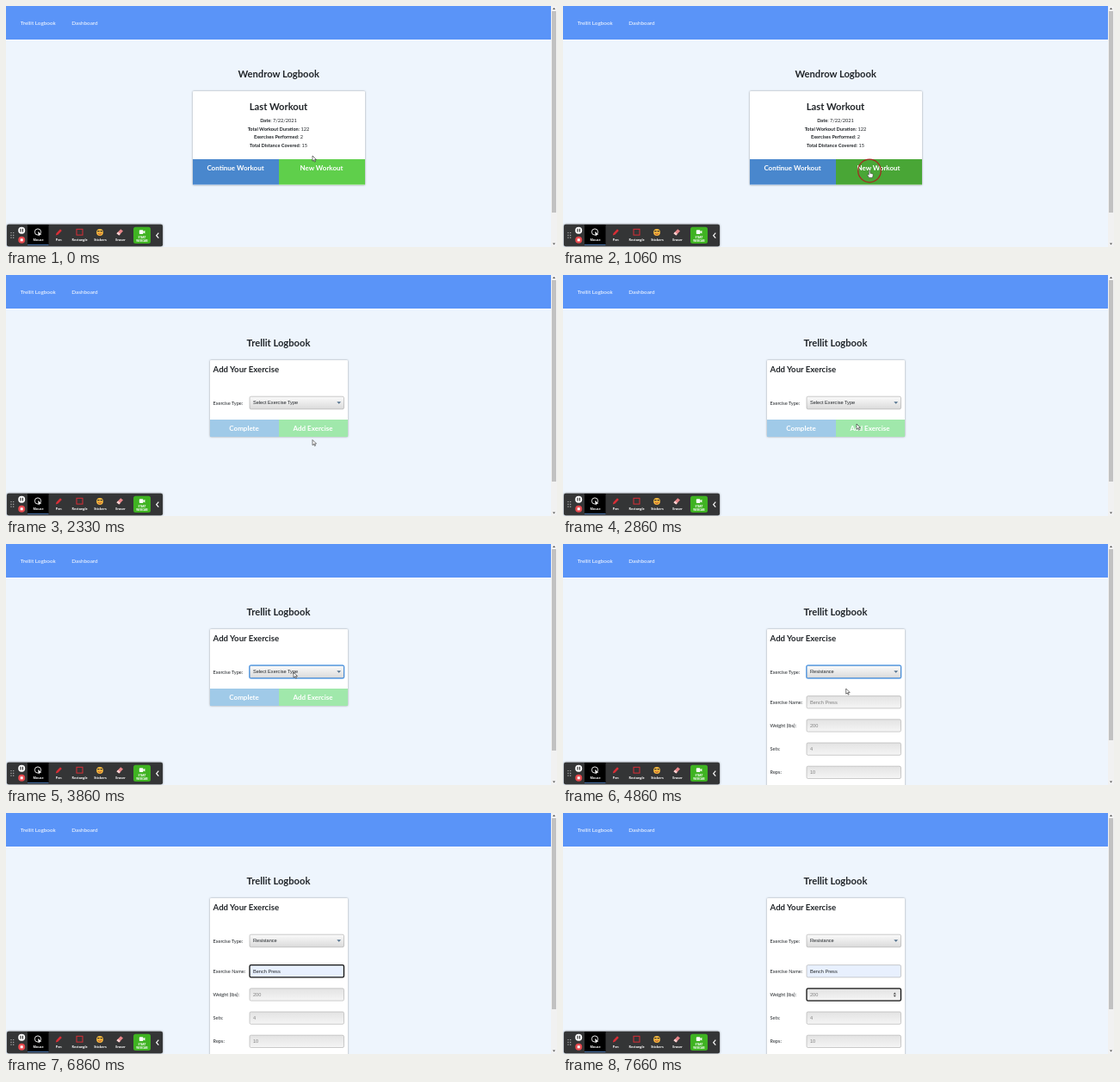
An HTML page for the animation above (8 s loop, 640 by 280 pixels).

```html
<!DOCTYPE html>
<html lang="en">
<head>
<meta charset="utf-8">
<title>Workout log</title>
<style>
html, body { margin: 0; width: 100%; height: 100%; overflow: hidden; background: #eef5fd; }
svg { display: block; width: 640px; height: 280px; }
text { font-family: Lato, sans-serif; fill: #212529; white-space: pre; }
.b { font-weight: 700; }
.mid { text-anchor: middle; }
.h1 { font-size: 11.2px; }
.h2 { font-size: 9.6px; }
.nav { font-size: 6.4px; fill: #fff; }
.row { font-size: 5.6px; }
.btn { font-size: 8px; fill: #fff; }
.val { font: 5.6px "Liberation Sans", Arial, sans-serif; }
.ph { fill: #808080; }
.tool { font: 700 3.7px "Open Sans", sans-serif; fill: #fff; text-anchor: middle; }
.card { fill: #fff; filter: drop-shadow(0 .5px 1.2px rgba(0,0,0,.38)); }
</style>
</head>
<body>
<svg viewBox="0 0 640 280">
  <defs>
    <linearGradient id="sel" x2="0" y2="1">
      <stop stop-color="#fbfbfb"/><stop offset="1" stop-color="#dadada"/>
    </linearGradient>
    <linearGradient id="inp" x2="0" y2="1">
      <stop stop-color="#e3e3e3"/><stop offset="1" stop-color="#f5f5f5"/>
    </linearGradient>
  </defs>
  <rect width="640" height="280" fill="#eef5fd"/>
  <rect width="633" height="39" fill="#5a94f8"/>
  <rect y="39" width="633" height="1" fill="#fbfdff"/>
  <text class="nav" x="16.7" y="22.3">Trellit Logbook</text>
  <text class="nav" x="76.2" y="22.3">Dashboard</text>

  <g id="home">
    <text class="h1 b mid" x="316.7" y="82.6">Wendrow Logbook</text>
    <rect class="card" x="217" y="99" width="200" height="109" rx="1"/>
    <text class="h1 b mid" x="316.5" y="120.6">Last Workout</text>
    <g id="stats"></g>
    <rect x="217" y="178" width="100" height="29.6" fill="#4987cd"/>
    <rect id="newBtn" x="317" y="178" width="100" height="29.6"/>
    <text class="btn b mid" x="266.5" y="191">Continue Workout</text>
    <text class="btn b mid" x="366.5" y="191">New Workout</text>
  </g>

  <g id="page">
    <text class="h1 b mid" x="316.5" y="82.6">Trellit Logbook</text>
    <rect id="card" class="card" x="237" y="99" width="160" height="89" rx="1"/>
    <text class="h2 b" x="240.6" y="112.6">Add Your Exercise</text>
    <text class="row" x="240.6" y="150.9">Exercise Type:</text>
    <rect id="glow" x="282" y="140.2" width="111.4" height="16.6" rx="2.5" fill="#7fb9f5"/>
    <rect id="select" x="283" y="141.2" width="109.5" height="14.6" rx="1.6" fill="url(#sel)"/>
    <text id="choice" class="val" x="287" y="150.4"></text>
    <path id="drop" d="M384.3 147.2h4.8l-2.4 2.6z"/>
    <g id="buttons">
      <rect x="237" y="168" width="80" height="20" fill="#a0cae8"/>
      <rect x="317" y="168" width="80" height="20" fill="#a0e8ab"/>
      <text class="btn b mid" x="276.6" y="181.4">Complete</text>
      <text class="btn b mid" x="356.5" y="181.4">Add Exercise</text>
    </g>
    <g id="fields"></g>
    <path id="caret" d="M288 180.7v6.3" stroke="#111" stroke-width=".6"/>
    <path id="spin" d="M383.7 210.4l1.6-2 1.6 2zM383.7 211.7l1.6 2 1.6-2z" fill="#444"/>
  </g>

  <rect x="633" width="7" height="280" fill="#f1f1f1"/>
  <rect id="thumb" x="634" y="6" width="5" fill="#c1c1c1"/>
  <path d="M635 4h3l-1.500-2zM635 275.500h3l-1.500 2z" fill="#505050"/>

  <g id="bar">
    <rect x="1" y="253.700" width="181" height="25.600" rx="2" fill="#343536"
      style="filter:drop-shadow(0 0 1.200px rgba(0,0,0,.5))"/>
    <rect x="25" y="254" width="24.500" height="24" fill="#000"/>
    <path d="M25 277.500h24.500" stroke="#5d92d8" stroke-width=".8"/>
    <path d="M6 263v7M8.700 263v7" stroke="#bbb" stroke-width="1.100" stroke-dasharray="1.100 1.700"/>
    <circle cx="18.200" cy="260.700" r="4" fill="#fff"/>
    <path d="M17 258.800v3.800M19.400 258.800v3.800" stroke="#222" stroke-width="1.100"/>
    <circle cx="18.200" cy="271.800" r="4" fill="#e5484d"/>
    <rect x="16.700" y="270.300" width="3" height="3" fill="#fff"/>
    <circle cx="37" cy="262.500" r="3.600" fill="none" stroke="#fff" stroke-width=".9"/>
    <path d="M37 262l4.300 3.500-2.200.3-1 2z" fill="#fff"/>
    <path d="M57.800 266.500l.7-2.500 4.500-4.800 1.900 1.800-4.600 4.800z" fill="#d92e36"/>
    <rect x="82" y="259.300" width="7" height="6.800" fill="none" stroke="#d92e36"/>
    <circle cx="109" cy="263" r="3.900" fill="#f5b83d"/>
    <path d="M106.300 261.700h2.200M109.600 261.700h2.200" stroke="#333" stroke-width="1.200"/>
    <path d="M107 264.400q2 2 4 0" fill="none" stroke="#a33" stroke-width=".8"/>
    <path d="M128.500 264.300l4.700-5 2.800 2.300-4.700 5z" fill="#e9868a"/>
    <path d="M128.500 264.300l1.600-1.700 2.800 2.300-1.600 1.700z" fill="#f6d5d5"/>
    <rect x="148" y="256.800" width="20" height="19.300" rx="2.500" fill="#3fb322"/>
    <rect x="154.800" y="260.300" width="4.600" height="4.800" rx=".8" fill="#fff"/>
    <path d="M159.200 262.200l2.200-1.500v3.800l-2.200-1.500z" fill="#fff"/>
    <path d="M177.300 263.700l-2.600 3 2.600 3" fill="none" stroke="#fff" stroke-width="1.200"/>
  </g>

  <circle id="ring" fill="none" stroke="#a52a22" stroke-width="1.300"/>
  <g id="cursor">
    <path id="arrow" d="M0 0v6.200l1.500-1.300 1 2.200 1-.4-1-2.200h2z" fill="#fff" stroke="#222" stroke-width=".6"/>
    <path id="hand" d="M-.7 0q.8-.8 1.500 0v2.800l2.700.7q.8.300.7 1.200l-.7 3.300h-4l-2-3.300q.4-1 1.800 0z"
      fill="#fff" stroke="#222" stroke-width=".5"/>
    <path id="beam" d="M-1-3h2M0-3v6M-1 3h2" fill="none" stroke="#333" stroke-width=".6"/>
  </g>
</svg>
<script>
const LOOP = 8000;
const $ = id => document.getElementById(id);
const set = (el, attrs) => { for (const k in attrs) el.setAttribute(k, attrs[k]); return el; };
const show = (id, on) => { $(id).style.display = on ? '' : 'none'; };
const add = (parent, tag, attrs, text = '') => {
  const el = set(document.createElementNS('http://www.w3.org/2000/svg', tag), attrs);
  el.textContent = text;
  return parent.appendChild(el);
};

[['Date', '7/22/2021'], ['Total Workout Duration', '122'],
 ['Exercises Performed', '2'], ['Total Distance Covered', '15']].forEach(([name, value], i) => {
  const line = add($('stats'), 'text', { class: 'row mid', x: 316.5, y: 135.1 + i * 9.65 });
  add(line, 'tspan', { class: 'b' }, name);
  add(line, 'tspan', {}, ': ' + value);
});

const fields = [['Exercise Name:', 'Bench Press'], ['Weight (lbs):', '200'],
  ['Sets:', '4'], ['Reps:', '10']].map(([label, hint], i) => {
  const y = 176.6 + i * 27.2, g = $('fields');
  add(g, 'text', { class: 'row', x: 240.6, y: y + 9.1 }, label);
  return {
    box: add(g, 'rect', { x: 283, y, width: 109.5, height: 14.3, rx: 1.6 }),
    text: add(g, 'text', { x: 287, y: y + 9.1 }, hint)
  };
});

[['Mouse', 37.500], ['Pen', 61.300], ['Rectangle', 85.700], ['Stickers', 109.500], ['Eraser', 133]]
  .forEach(([name, x]) => add($('bar'), 'text', { class: 'tool', x, y: 272.7 }, name));
['START', 'WEBCAM'].forEach((word, i) =>
  add($('bar'), 'text', { class: 'tool', x: 158, y: 270.3 + i * 3.2, style: 'font-size:3px' }, word));

// time, x, y
const path = [[0, 356, 174], [560, 356, 191.5], [2330, 356, 191.5], [2860, 341, 173],
  [3260, 334, 149], [4859, 334, 149], [4860, 328.7, 168], [5260, 318, 184]];
// start, end, x, y
const clicks = [[960, 1360, 356, 191.5], [3400, 3700, 334, 149], [5600, 5900, 318, 184]];

function pointAt(t) {
  const i = path.findIndex(p => p[0] > t);
  if (i < 0) return path[path.length - 1].slice(1);
  const [a, b] = [path[i - 1], path[i]];
  const u = (t - a[0]) / (b[0] - a[0]), e = u * u * (3 - 2 * u);
  return [a[1] + (b[1] - a[1]) * e, a[2] + (b[2] - a[2]) * e];
}

function styleField({ box, text }, focused, filled) {
  set(box, {
    fill: filled ? '#e8f0fe' : 'url(#inp)',
    stroke: focused ? '#101010' : '#a9a9a9',
    'stroke-width': focused ? 1.3 : .6
  });
  set(text, { class: filled ? 'val' : 'val ph' });
}

function draw(t) {
  const step = Math.max(0, Math.floor((t - 60) / 100) * 100 + 60);
  const home = t < 2330, form = t >= 4860;
  const picked = t >= 3400 && t < 5600;

  show('home', home);
  show('page', !home);
  set($('newBtn'), { fill: t < 360 ? '#5fcf4b' : t >= 960 && t < 1360 ? '#49a636' : '#53b536' });

  set($('card'), { height: form ? 190 : 89 });
  show('buttons', !form);
  show('fields', form);
  show('glow', picked);
  set($('select'), { stroke: picked ? '#3b82cf' : '#a5a5a5', 'stroke-width': picked ? .9 : .6 });
  $('choice').textContent = form ? 'Resistance' : 'Select Exercise Type';
  set($('drop'), { fill: '#50708c' });
  fields.forEach((f, i) => styleField(f,
    i === 0 && t >= 5600 && t < 7130 || i === 1 && t >= 7130,
    i === 0 && t >= 5800));
  show('caret', t >= 5600 && t < 6400);
  show('spin', t >= 7130);
  set($('thumb'), { height: form ? 222 : 234 });

  const hit = clicks.find(c => step >= c[0] && step < c[1]);
  show('ring', hit);
  if (hit) set($('ring'), { cx: hit[2], cy: hit[3], r: Math.min(13.3, 11 + (step - hit[0]) * .023) });

  const [x, y] = pointAt(step);
  set($('cursor'), { transform: `translate(${x} ${y})` });
  const hand = step >= 360 && home, beam = step >= 5160;
  show('cursor', t < 5900);
  show('hand', hand);
  show('beam', beam);
  show('arrow', !hand && !beam);
}

const start = performance.now();
function tick() {
  draw((performance.now() - start) % LOOP);
  requestAnimationFrame(tick);
}
tick();
</script>
</body>
</html>
```
